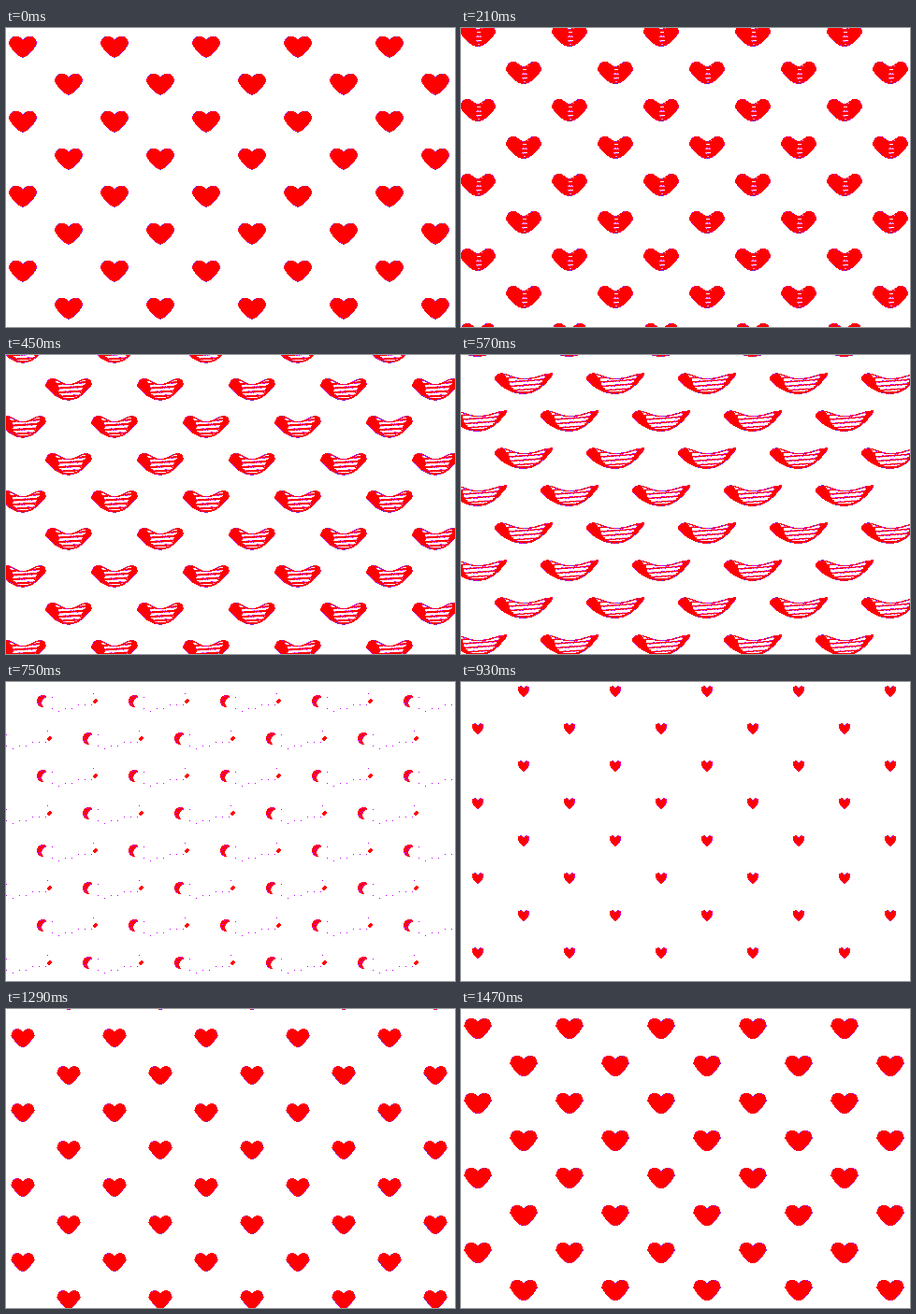
Recreate the animation shown at these times as an HTML page with a canvas. Size 480x320 px, loop 1.5 s.

```html
<!DOCTYPE html>
<html lang="en">
<head>
<meta charset="utf-8">
<title>Hearts</title>
<style>
html, body { margin: 0; width: 100%; height: 100%; overflow: hidden; background: #fff; }
canvas { display: block; }
</style>
</head>
<body>
<canvas id="stage" width="480" height="320"></canvas>
<script>
const LOOP = 1500, STEP = 30, BURST = 750, BIRTH = 800;
const RED = '#f00', VIOLET = '#c0f', BLUE = '#63f', LILAC = '#f9f', WHITE = '#fff';

const stage = document.getElementById('stage').getContext('2d');
const sprite = document.createElement('canvas');
sprite.width = 80;
sprite.height = 40;
const pen = sprite.getContext('2d');

function noise(x, y) {
  const n = Math.sin(x * 12.99 + y * 78.23) * 43758.55;
  return n - Math.floor(n);
}

function dot(x, y, color) {
  pen.fillStyle = color;
  pen.fillRect(x + 40, y + 20, 1, 1);
}

// A heart grows from nothing, then widens, sags and tears as f goes from 0 to 1
function poseAt(t) {
  const born = t >= BIRTH;
  const f = born ? 0 : Math.min(1, t / BURST);
  const grow = born ? Math.sqrt((t - BIRTH) / (LOOP - BIRTH)) : 1;
  const tall = grow ** .8;
  const late = f ** 5;
  return {
    f,
    width: Math.min(34, 15 + 14 * f + 30 * f ** 6) * grow,
    top: (11.4 + 6 * f - 11 * f * f) * tall,
    notch: (8 - 5 * f) * tall,
    tip: (11.6 + 1.6 * f) * tall,
    shoulder: [2.5 * tall, (2.5 + 22 * late) * tall],
    lobe: [.5 + .35 * f, Math.min(.97, .5 + .35 * f + .8 * late)],
    reach: [30 * (f - .19), 38 * (f - .18)]
  };
}

// Upper and lower limit of the heart at column x
function limits(pose, x) {
  const a = Math.abs(x) / pose.width;
  if (!(a < 1)) return null;
  const half = x < 0 ? 0 : 1;
  const { f, top, notch, tip } = pose;
  const side = pose.shoulder[half], c = pose.lobe[half];
  const rise = a < c
    ? notch + (top - notch) * Math.sin(Math.PI / 2 * a / c) ** (1 + 2 * f)
    : side + (top - side) * Math.sqrt(1 - ((a - c) / (1 - c)) ** 2);
  return [-rise, -side + (tip + side) * (1 - a ** (1.7 + .6 * f))];
}

// The tear is a stack of slanted stripes that get longer and thicker
function tearColor(pose, x, y) {
  const { f } = pose;
  const v = y + x * .1 * f + 4;
  const reach = pose.reach[x < 0 ? 0 : 1] * (1 - .03 * v);
  if (Math.abs(x) > reach + 2 * noise(y, 5) - 1) return RED;
  const wave = Math.cos(v * 2 * Math.PI / 4.6);
  const cut = 1.6 - 2.3 * f;
  if (wave > cut) return WHITE;
  if (wave > cut - .6) return noise(x, y) < .7 ? LILAC : VIOLET;
  return RED;
}

function drawHeart(t) {
  const pose = poseAt(t);
  const keep = t < BIRTH && t > 600 ? 1 - (t - 600) / 130 : 1;
  for (let x = -35; x < 36; x++) {
    const span = limits(pose, x + .5);
    if (!span) continue;
    const end = !limits(pose, x - .5) || !limits(pose, x + 1.5);
    for (let y = -14; y < 15; y++) {
      const up = y + .5 - span[0], down = span[1] - y - .5;
      if (up < 0 || down < 0 || noise(x, y) > keep) continue;
      let color = RED;
      if (end || up < 1 || down < 1) {
        const n = noise(x + 7, y + 3);
        if (n < .3) color = n < .12 ? BLUE : VIOLET;
      } else if (up > 1.5 && down > 1 + 2 * pose.f) {
        color = tearColor(pose, x, y);
      }
      if (color !== WHITE) dot(x, y, color);
    }
  }
}

// Crescent on the left, a tilted fleck on the right, a few specks between
function drawRemains(t) {
  const k = Math.min(1, (BIRTH + 10 - t) / 60);
  for (let x = -7; x < 4; x++) {
    for (let y = -7; y < 8; y++) {
      const crescent = Math.hypot(x, y) < 6.5 * k && Math.hypot(x - 4.5 * k, y - 2 * k) > 5.6 * k;
      if (crescent) dot(x - 28, y, noise(x, y) < .15 ? VIOLET : RED);
      if (Math.abs(x + y) < 2.5 * k && Math.abs(x - y) < 3.5 * k) dot(x + 28, y, RED);
    }
  }
  if (t < 720) return;
  for (let i = 0; i < 7; i++) {
    dot(7 * i - 18, Math.round(4 + 7 * noise(i, 2) ** 3), VIOLET);
  }
  for (const side of [-1, 1]) dot(4 + 22 * side, -6 - 2 * side, VIOLET);
}

function render(t) {
  pen.clearRect(0, 0, 80, 40);
  drawHeart(t);
  if (t > 660 && t < BIRTH) drawRemains(t);

  stage.fillStyle = WHITE;
  stage.fillRect(0, 0, 480, 320);
  const lift = 80 * t / LOOP;
  for (let row = 0; row < 11; row++) {
    const y = Math.floor(20 + 40 * row - lift + 1e-6);
    for (let col = 0; col < 5; col++) {
      stage.drawImage(sprite, 18 + 49 * (row % 2) + 98 * col - 40, y - 20);
    }
  }
}

let start, shown = -1;
function tick(now) {
  if (start === undefined) start = now;
  const t = Math.floor(((now - start) % LOOP) / STEP) * STEP;
  if (t !== shown) render(shown = t);
  requestAnimationFrame(tick);
}
render(0);
requestAnimationFrame(tick);
</script>
</body>
</html>
```
